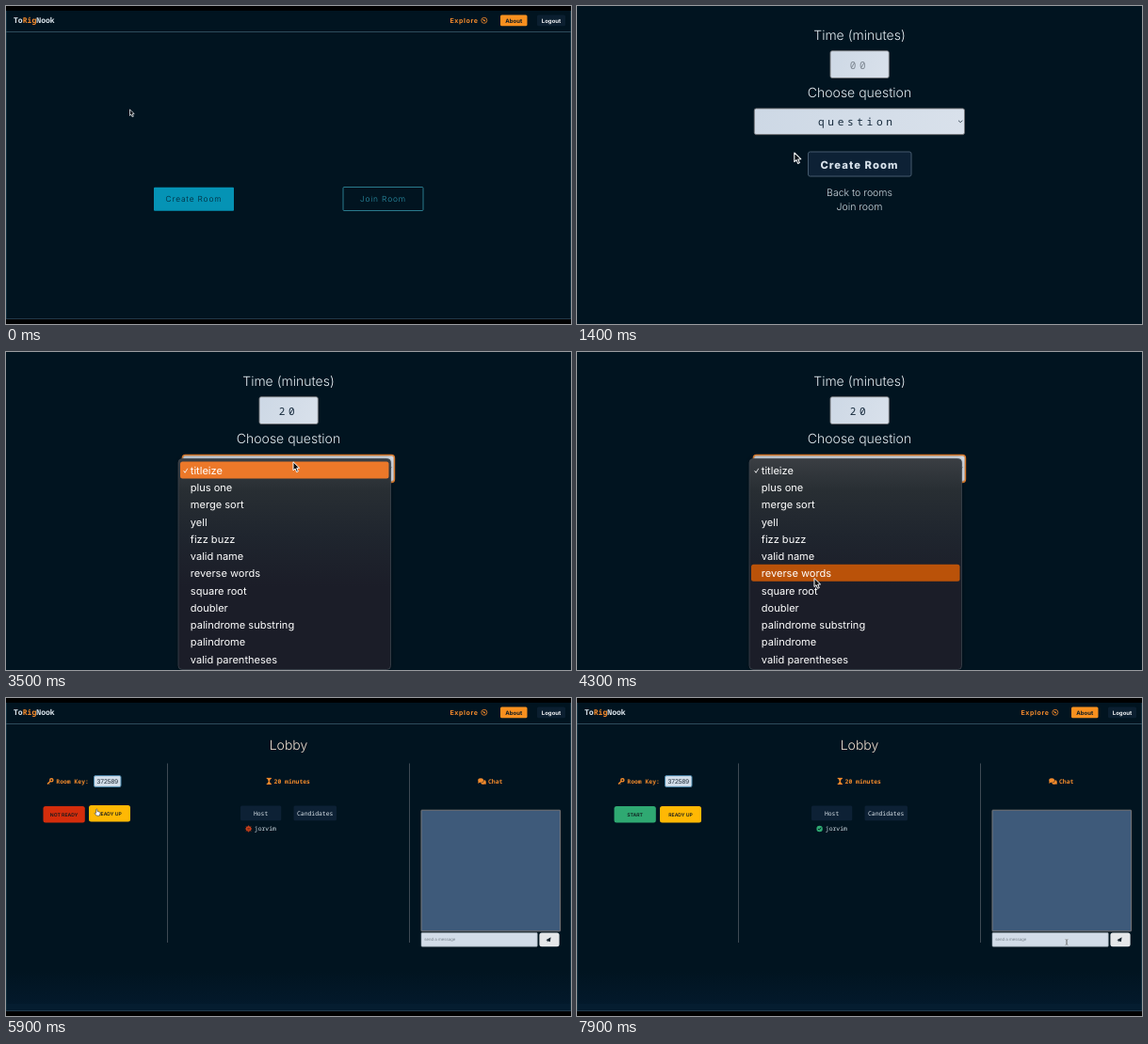
Animation of 600 by 338 pixels, one loop 8000 ms. Source, as an HTML page with a canvas:

```html
<!DOCTYPE html>
<html lang="en">
<head>
<meta charset="utf-8">
<title>Interview room</title>
<style>
  html, body { margin: 0; width: 100%; height: 100%; overflow: hidden; background: #000; }
  canvas { display: block; width: 600px; height: 338px; }
</style>
</head>
<body>
<canvas id="stage"></canvas>
<script>
const W = 600, H = 338, LOOP = 8000;
const canvas = document.getElementById('stage');
const ctx = canvas.getContext('2d');
const dpr = window.devicePixelRatio || 1;
canvas.width = W * dpr;
canvas.height = H * dpr;
ctx.textRendering = 'geometricPrecision';

const SANS = 'Inter, "Open Sans", sans-serif';
const MONO = '"Noto Sans Mono", "DejaVu Sans Mono", monospace';
const ARIAL = '"Liberation Sans", sans-serif';
const BG = '#011420', ORANGE = '#f48b2c', PANEL = '#0d2135', FIELD = '#d2dce8', PALE = '#dce5ec';

// When things happen, in ms
const FORM = 1200, FOCUS_TIME = 1900, TYPE_2 = 2300, TYPE_0 = 2500,
      OPEN = 3200, CLOSE = 4800, LOBBY = 5400, READY = 6350;

const OPTIONS = ['titleize', 'plus one', 'merge sort', 'yell', 'fizz buzz', 'valid name',
  'reverse words', 'square root', 'doubler', 'palindrome substring', 'palindrome', 'valid parentheses'];

// Pointer path: time, x, y
const PATH = [
  [0, 131.5, 110], [250, 131.5, 110], [950, 204, 204], [1200, 204, 204],
  [1400, 230.8, 156], [1850, 318, 60], [3000, 318, 60], [3200, 307, 117], [3500, 305, 116.8],
  [3900, 300, 128], [4300, 252, 240.5], [4600, 244, 272], [4780, 246, 270],
  [4900, 276, 198], [5150, 300, 172], [5400, 300, 172],
  [5800, 96.3, 118], [6500, 96.3, 118], [7500, 520, 259.5], [8000, 520, 259.5]
];

function pointerAt(t) {
  let i = 1;
  while (i < PATH.length - 1 && t >= PATH[i][0]) i++;
  const [t0, x0, y0] = PATH[i - 1], [t1, x1, y1] = PATH[i];
  const p = Math.min(1, (t - t0) / (t1 - t0)), e = p * p * (3 - 2 * p);
  return { x: x0 + (x1 - x0) * e, y: y0 + (y1 - y0) * e };
}

const inside = (p, x, y, w, h) => p.x >= x && p.x <= x + w && p.y >= y && p.y <= y + h;

function box(x, y, w, h, fill, r = 0, stroke, line = 1) {
  ctx.beginPath();
  ctx.roundRect(x, y, w, h, r);
  if (fill) { ctx.fillStyle = fill; ctx.fill(); }
  if (stroke) { ctx.strokeStyle = stroke; ctx.lineWidth = line; ctx.stroke(); }
}

function text(str, x, y, size, color, { font = SANS, weight = 400, align = 'left', gap = 0 } = {}) {
  ctx.font = `${weight} ${size}px ${font}`;
  ctx.letterSpacing = gap + 'px';
  ctx.textAlign = align;
  ctx.fillStyle = color;
  ctx.fillText(str, x + (align === 'center' ? gap / 2 : 0), y);
}

const centered = (str, x, y, size, color, opt) => text(str, x, y, size, color, { align: 'center', ...opt });

function line(points, color, width = 1) {
  ctx.beginPath();
  points.forEach(([x, y], i) => i ? ctx.lineTo(x, y) : ctx.moveTo(x, y));
  ctx.strokeStyle = color;
  ctx.lineWidth = width;
  ctx.stroke();
}

function dot(x, y, r, color) {
  ctx.beginPath();
  ctx.arc(x, y, r, 0, Math.PI * 2);
  ctx.fillStyle = color;
  ctx.fill();
}

function shape(points, fill) {
  ctx.beginPath();
  points.forEach(([x, y], i) => i ? ctx.lineTo(x, y) : ctx.moveTo(x, y));
  ctx.closePath();
  ctx.fillStyle = fill;
  ctx.fill();
}

// Pointers

function arrow(p, s, dark) {
  ctx.save();
  ctx.translate(p.x, p.y);
  ctx.scale(s, s);
  shape([[0, 0], [0, 10], [2.3, 8], [4, 12], [5.9, 11.2], [4.2, 7.3], [7.3, 7.1]], dark ? '#101010' : '#0a1218');
  ctx.strokeStyle = '#fff';
  ctx.lineJoin = 'round';
  ctx.lineWidth = 1.1;
  ctx.stroke();
  ctx.restore();
}

function hand(p, s) {
  ctx.save();
  ctx.translate(p.x, p.y);
  ctx.scale(s, s);
  ctx.beginPath();
  ctx.moveTo(-1, 0.8);
  ctx.quadraticCurveTo(0, -0.8, 1, 0.8);
  ctx.lineTo(1.3, 4.2);
  ctx.lineTo(5, 5);
  ctx.quadraticCurveTo(6.4, 5.4, 6, 8);
  ctx.lineTo(5, 11.5);
  ctx.lineTo(0, 11.5);
  ctx.lineTo(-3.4, 7.4);
  ctx.quadraticCurveTo(-3.2, 5.8, -1, 7);
  ctx.closePath();
  ctx.fillStyle = '#fff';
  ctx.fill();
  ctx.strokeStyle = '#1a1f26';
  ctx.lineWidth = 0.9;
  ctx.stroke();
  ctx.restore();
}

function beam(p, s) {
  for (const [color, w] of [['#eef2f5', 1.6], ['#20242a', 0.8]]) {
    const h = 5 * s, a = 1.6 * s;
    line([[p.x - a, p.y - h], [p.x, p.y - h + 1], [p.x + a, p.y - h]], color, w);
    line([[p.x, p.y - h + 1], [p.x, p.y + h - 1]], color, w);
    line([[p.x - a, p.y + h], [p.x, p.y + h - 1], [p.x + a, p.y + h]], color, w);
  }
}

// Pages

function frame() {
  ctx.fillStyle = '#000';
  ctx.fillRect(0, 0, W, H);
  ctx.fillStyle = BG;
  ctx.fillRect(0, 5, W, 328);
  line([[0.5, 5], [0.5, 333]], '#0d2c3c');
  line([[599.5, 5], [599.5, 333]], '#0d2c3c');
  line([[0, 27.5], [W, 27.5]], '#2f4c5c');
  line([[0, 332.5], [W, 332.5]], '#22394a');

  const brand = { font: MONO, weight: 700 };
  text('To', 8, 18.4, 8.1, PALE, brand);
  text('Rig', 17.7, 18.4, 8.1, ORANGE, brand);
  text('Nook', 32.3, 18.4, 8.1, PALE, brand);

  text('Explore', 471.5, 18, 7, ORANGE, { weight: 700, gap: 0.6 });
  ctx.beginPath();
  ctx.arc(507.8, 15.3, 3, 0, Math.PI * 2);
  ctx.strokeStyle = ORANGE;
  ctx.lineWidth = 0.8;
  ctx.stroke();
  shape([[506, 13.8], [508.4, 14.7], [509.6, 16.6], [507.2, 15.9]], ORANGE);
  box(525, 9.5, 28.5, 11.8, '#f8901f', 1.5);
  centered('About', 539.3, 17.6, 6, '#0b1a24', { weight: 700 });
  box(564, 9.5, 30, 11.8, '#0b1f30', 1.5);
  centered('Logout', 579, 17.6, 6, '#f4f6f8', { weight: 700 });
}

function home(p) {
  frame();
  const label = { weight: 300, gap: 0.85 };
  box(157, 192.7, 85, 25, '#0593b5', 1);
  centered('Create Room', 199, 208, 8.4, '#032536', label);
  box(358, 192.5, 85, 25, null, 1, '#2a7b8d');
  centered('Join Room', 400, 208, 8.4, '#2c93aa', label);
  inside(p, 157, 192, 85, 26) ? hand(p, 0.65) : arrow(p, 0.65);
}

function field(x, y, w, h, focused) {
  const shade = ctx.createLinearGradient(x, y, x + w, y + h);
  shade.addColorStop(0, '#cdd8e5');
  shade.addColorStop(1, '#d9e1eb');
  if (focused) {
    box(x - 0.7, y - 0.3, w + 1.4, h + 0.9, null, 3, '#d97a2c', 2);
    box(x, y + 0.6, w, h - 0.9, shade, 2, '#c9b7a8', 0.7);
  } else {
    box(x, y, w, h, shade, 2, '#77767a', 0.9);
  }
}

function menu(t, p) {
  const shade = ctx.createLinearGradient(0, 113, 0, 250);
  shade.addColorStop(0, '#3a3e43');
  shade.addColorStop(0.25, '#282e33');
  shade.addColorStop(0.6, '#1f252e');
  shade.addColorStop(1, '#1b1d28');
  ctx.save();
  ctx.shadowColor = 'rgba(0,0,0,0.4)';
  ctx.shadowBlur = 5 * dpr;
  box(183, 113.5, 225.5, 224, shade, 4);
  ctx.restore();
  box(183, 113.5, 225.5, 224, null, 4, '#3e464e', 0.8);

  const pitch = 18.24, top = 116.4;
  const row = Math.max(0, Math.min(11, Math.floor((p.y - top) / pitch)));
  box(185, top + row * pitch, 221.5, 18, t < 3800 ? '#ec7829' : '#ba5209', 2.5);
  OPTIONS.forEach((name, i) => text(name, 195.8, 130 + i * pitch, 11.05, '#fff'));
  line([[188.6, 126.2], [190.1, 128.3], [192.8, 123.8]], '#f4f4f4', 0.9);
}

function form(t, p) {
  ctx.fillStyle = BG;
  ctx.fillRect(0, 0, W, H);
  const open = t >= OPEN && t < CLOSE;
  const timeFocus = t >= FOCUS_TIME && t < OPEN - 100;
  const pickFocus = t >= OPEN - 100;
  const dy = timeFocus ? 2 : 0, sy = dy + (pickFocus ? 1 : 0), by = dy + (pickFocus ? 2 : 0);
  const light = { weight: 300 };

  centered('Time (minutes)', 300, 35.6, 14, '#e6edf2', light);
  field(269, 47.7 + dy / 2, 62.3, 28.8, timeFocus);
  const typed = t >= TYPE_0 ? '20' : t >= TYPE_2 ? '2' : '';
  text(typed || '00', 289.8, 66.5 + dy / 2, 11, typed ? '#14283a' : '#7d8791', { font: MONO, gap: 3.6 });

  centered('Choose question', 300, 97.4 + dy, 14, '#e6edf2', light);
  field(188.3, 109 + sy, 223.2, 27.6, pickFocus);
  const choice = t >= CLOSE ? 'doubler' : 'question';
  text(choice, choice === 'doubler' ? 261.3 : 256, 127 + sy, 11.2, '#14283a', { font: MONO, gap: 3.6 });
  line([[405, 121.7 + sy], [407.2, 123.7 + sy], [409.4, 121.7 + sy]], '#4a5866', 1);

  box(245.5, 155 + by, 109.5, 26, PANEL, 2, '#465b6e');
  centered('Create Room', 299.5, 172.6 + by, 11.3, '#d9e3ec', { weight: 800, gap: 1.05 });
  centered('Back to rooms', 300, 201.6 + by, 10.5, '#cfd9e0', light);
  centered('Join room', 300, 216.6 + by, 10.5, '#cfd9e0', light);

  const onBack = !open && inside(p, 265, 191 + by, 70, 13);
  if (onBack) line([[265, 203.5 + by], [335, 203.5 + by]], '#cfd9e0', 0.8);
  if (open) {
    menu(t, p);
    arrow(p, 0.9, true);
  } else if (onBack || inside(p, 245, 155 + by, 110, 26)) {
    hand(p, 0.95);
  } else if (inside(p, 269, 48, 62, 29)) {
    beam(p, 1);
  } else {
    arrow(p, 0.95);
  }
}

function keyIcon(x, y) {
  ctx.beginPath();
  ctx.arc(x + 1.3, y - 1, 1.6, 0, Math.PI * 2);
  ctx.strokeStyle = ORANGE;
  ctx.lineWidth = 1.4;
  ctx.stroke();
  line([[x, y + 0.2], [x - 3, y + 3.2]], ORANGE, 1.4);
  line([[x - 2, y + 2], [x - 0.8, y + 3.2]], ORANGE, 1);
}

function hourglass(x, y) {
  line([[x - 2.6, y - 3], [x + 2.6, y - 3]], ORANGE, 1.1);
  line([[x - 2.6, y + 3], [x + 2.6, y + 3]], ORANGE, 1.1);
  shape([[x - 2, y - 3], [x + 2, y - 3], [x + 0.5, y], [x + 2, y + 3], [x - 2, y + 3], [x - 0.5, y]], ORANGE);
}

function bubbles(x, y) {
  const blob = (cx, cy, rx, ry, color) => {
    ctx.beginPath();
    ctx.ellipse(cx, cy, rx, ry, 0, 0, Math.PI * 2);
    ctx.fillStyle = color;
    ctx.fill();
  };
  blob(x + 1.6, y + 1, 2.8, 2.3, ORANGE);
  shape([[x + 2.5, y + 2], [x + 4.6, y + 3.7], [x + 4, y + 1]], ORANGE);
  blob(x - 1.2, y - 0.9, 3.4, 2.8, BG);
  blob(x - 1.2, y - 0.9, 2.9, 2.3, ORANGE);
  shape([[x - 3.5, y], [x - 4.3, y + 2.4], [x - 1.3, y + 1]], ORANGE);
}

function status(x, y, ready) {
  if (ready) {
    dot(x, y, 3.2, '#2fa972');
    line([[x - 1.5, y], [x - 0.4, y + 1.2], [x + 1.6, y - 1.2]], BG, 0.9);
    return;
  }
  for (let i = 0; i < 4; i++) {
    const a = i * Math.PI / 4, cx = Math.cos(a) * 3.5, cy = Math.sin(a) * 3.5;
    line([[x - cx, y - cy], [x + cx, y + cy]], '#c8401b', 0.9);
  }
  dot(x, y, 2.8, '#c8401b');
  line([[x - 1.3, y - 0.5], [x + 1.3, y - 0.5]], '#5b1c12', 0.6);
  line([[x - 1.3, y + 0.9], [x + 1.3, y + 0.9]], '#5b1c12', 0.6);
}

function lobby(t, p) {
  frame();
  const footer = ctx.createLinearGradient(0, 290, 0, 325);
  footer.addColorStop(0, 'rgba(3,25,43,0)');
  footer.addColorStop(1, '#03192b');
  ctx.fillStyle = footer;
  ctx.fillRect(1, 290, 598, 35);
  ctx.fillStyle = '#051d30';
  ctx.fillRect(1, 325, 598, 7);

  centered('Lobby', 300, 55.3, 14, '#f0ddcf', { weight: 300 });
  for (const x of [171.5, 428.5]) line([[x, 69.5], [x, 260]], '#3e4a54');

  const head = { font: MONO, weight: 700 }, plain = { font: MONO, weight: 500 };
  keyIcon(47, 88.3);
  text('Room Key:', 53.3, 90.8, 6.4, ORANGE, head);
  box(93.5, 82.6, 28.5, 11.8, '#d3dfeb', 1.5, '#4784a8');
  centered('372589', 107.8, 90.9, 6.8, '#17232e', { font: ARIAL });
  hourglass(279.3, 88.4);
  text('20 minutes', 284.6, 90.8, 6.4, ORANGE, head);
  bubbles(505.3, 88.4);
  text('Chat', 512, 90.8, 6.4, ORANGE, head);

  const ready = t >= READY, bold = { weight: 600 };
  const lift = (x) => inside(p, x, 114, 44, 18) ? 1 : 0;
  const l1 = lift(39.5), l2 = lift(88);
  box(39.5, 115 - l1, 44.3, 17.4, ready ? '#2fa972' : '#d42d0c', 2.5);
  centered(ready ? 'START' : 'NOT READY', 61.6, 125.5 - l1, 5.1, '#10191d', bold);
  box(88, 115 - l2, 44, 17.4, '#ffb804', 2.5);
  centered('READY UP', 110, 125.5 - l2, 5.1, '#10191d', bold);

  box(249, 114.5, 43.3, 15.8, PANEL, 1.5);
  centered('Host', 270.6, 124.9, 6.4, PALE, plain);
  box(305.5, 114.5, 45.5, 15.8, PANEL, 1.5);
  centered('Candidates', 328.2, 124.9, 6.4, PALE, plain);
  status(257.6, 139, ready);
  text('jorvim', 263.8, 141.4, 6.4, PALE, plain);

  box(441, 119.2, 147.6, 128.6, '#3e5a7a', 0.5, '#837d7c', 0.9);
  box(441, 249.4, 123.3, 14.8, FIELD, 1, '#8f9aa5', 0.6);
  text('send a message', 444.3, 258.3, 4.5, '#78828c', { font: ARIAL });
  box(566.4, 249.4, 21.2, 14.8, '#e5e7e9', 2.5);
  shape([[578.6, 254.2], [577.8, 259.2], [575.8, 258.3], [574.8, 259.4], [574.8, 257.8], [573.4, 257.2]], '#17232e');

  if (l1 || l2 || inside(p, 566, 249, 21, 15)) hand(p, 0.62);
  else if (inside(p, 441, 249, 123, 15)) beam(p, 0.62);
  else arrow(p, 0.65);
}

function draw(now) {
  const t = now % LOOP, p = pointerAt(t);
  ctx.setTransform(dpr, 0, 0, dpr, 0, 0);
  if (t < FORM) home(p);
  else if (t < LOBBY) form(t, p);
  else lobby(t, p);
}

const start = performance.now();
function tick() {
  draw(performance.now() - start);
  requestAnimationFrame(tick);
}
tick();
</script>
</body>
</html>
```
